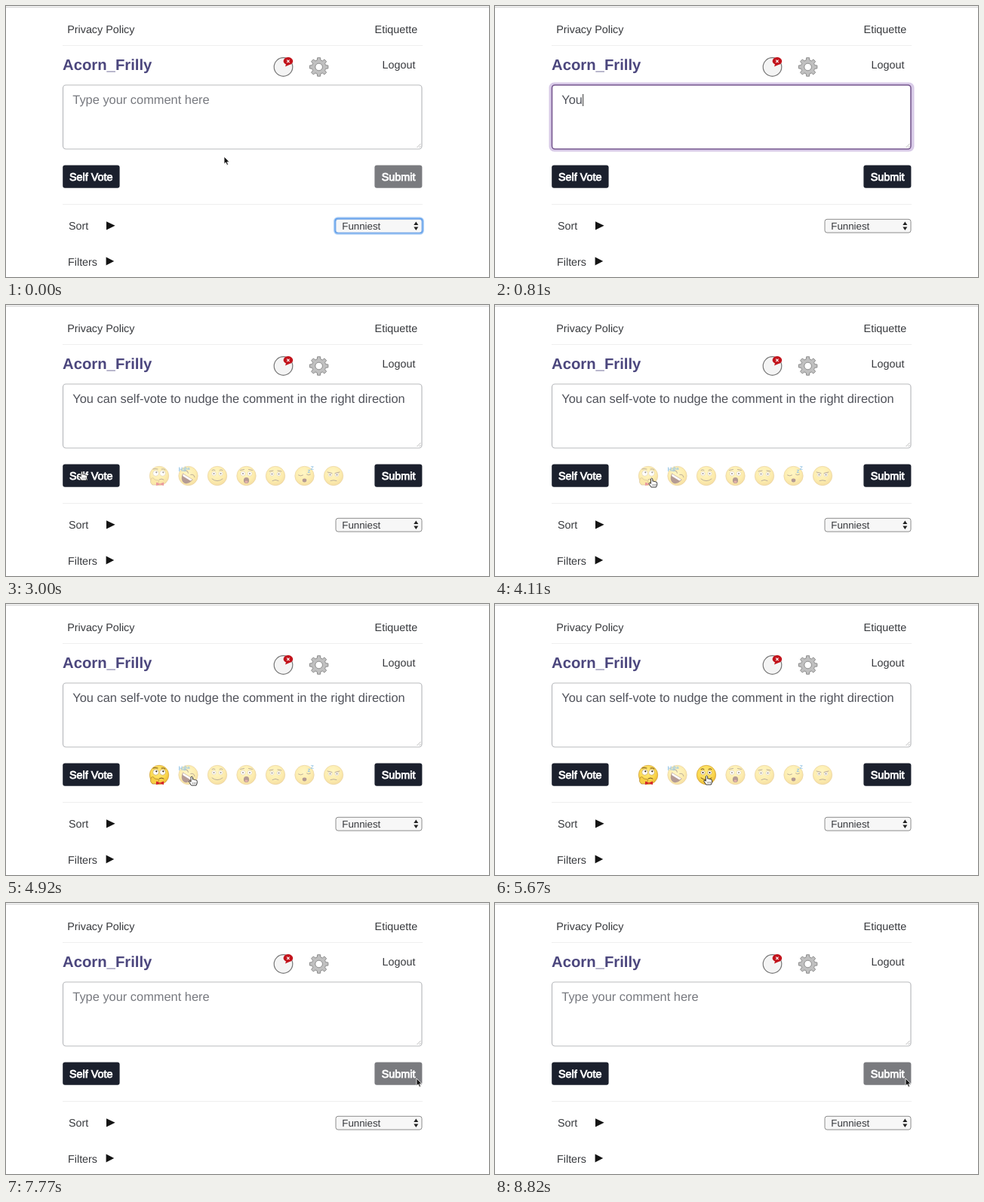
An HTML page for the animation above (8850 ms loop, 640 px wide and 360 px high).

```html
<!DOCTYPE html>
<html lang="en">
<head>
<meta charset="utf-8">
<title>Comment form</title>
<style>
html, body { margin: 0; width: 100%; height: 100%; overflow: hidden; background: #fff; }
svg { display: block; width: 640px; height: 360px; }
text { font: 14.35px "Liberation Sans", Arial, sans-serif; fill: #37393d; white-space: pre; text-rendering: geometricPrecision; }
.name { font-size: 20.3px; font-weight: bold; fill: #4b467d; }
.button text { fill: #fff; stroke: #fff; stroke-width: .8px; }
#comment { font-size: 16.4px; }
.line { fill: none; stroke: #6d4d20; stroke-width: 1; stroke-linecap: round; stroke-linejoin: round; }
</style>
</head>
<body>
<svg viewBox="0 0 640 360">
  <defs>
    <radialGradient id="skin" cx=".45" cy=".35" r=".65">
      <stop offset="0" stop-color="#ffec80"/>
      <stop offset=".65" stop-color="#fbd84f"/>
      <stop offset="1" stop-color="#ecb935"/>
    </radialGradient>
  </defs>
  <path d="M0 1.5H640" stroke="#dadada" stroke-width="1.5"/>
  <path d="M75 52.5H552M75 263.5H552" stroke="#efefef"/>

  <text x="81.2" y="35.5">Privacy Policy</text>
  <text x="488.6" y="35.5">Etiquette</text>
  <text x="498.5" y="83.2">Logout</text>
  <text x="75" y="85" class="name">Acorn_Frilly</text>
  <text x="83" y="296.7">Sort</text>
  <text x="82" y="344.7">Filters</text>
  <path d="M133 286.2L144.6 291.8L133 297.4ZM132.6 333.6L143.2 339L132.6 344.4Z" fill="#141414"/>

  <circle cx="367.5" cy="81" r="12.3" fill="#f4f4f4" stroke="#777" stroke-width="1.2"/>
  <path d="M367.6 73.3a6.3 5.2 0 1 1 7.6 5l-5.2 2.2 1-3a5.4 5 0 0 1-3.4-4.2Z" fill="#c2141c"/>
  <path d="M372.2 71.7l3.4 3.4m0-3.4l-3.4 3.4" stroke="#fff" stroke-width="1.1"/>
  <path id="gear" transform="translate(414.6 81)" fill="#c0c0c0" stroke="#8c8c8c" fill-rule="evenodd" stroke-linejoin="round"/>

  <rect id="glow" x="73.5" y="103.5" width="480" height="88" rx="5" fill="none" stroke="#d9cbe8" stroke-width="4"/>
  <rect id="area" x="75.5" y="105" width="475.5" height="85" rx="4" fill="#fff"/>
  <path d="M544.5 188l5-5m-2 5l2-2" stroke="#aaa" stroke-width=".8"/>
  <text id="comment" x="88.3" y="130"></text>
  <path id="caret" stroke="#333"/>

  <g class="button">
    <rect x="75.2" y="211.4" width="75.4" height="30.4" rx="3" fill="#1b202d"/>
    <text x="84" y="231.8">Self Vote</text>
    <rect id="submit" x="488.4" y="211.4" width="63" height="30.4" rx="3"/>
    <text x="497.8" y="231.8">Submit</text>
  </g>

  <g id="focus" fill="none" stroke="#5b9dec">
    <rect x="435.5" y="281.8" width="117" height="20.5" rx="4" stroke-width="3" opacity=".5"/>
    <rect x="436.5" y="282.8" width="115" height="18.5" rx="3" stroke-width="2"/>
  </g>
  <rect id="select" x="437" y="283.3" width="114" height="17.8" rx="3" fill="#f7f7f7"/>
  <text x="445.3" y="296.8" style="font-size:13.3px">Funniest</text>
  <path d="M540.3 291L543.3 286.6L546.3 291ZM540.3 293.6L543.3 298L546.3 293.6Z" fill="#222"/>

  <g id="faces"></g>

  <g id="arrow">
    <path d="M0 0V9.8L2.2 7.8L3.8 11.4L5.5 10.6L4 7.2H7Z" fill="#111" stroke="#fff" stroke-width=".8" stroke-linejoin="round"/>
  </g>
  <g id="hand">
    <path d="M-1.2 1Q0 -.8 1.2 1V4.2Q2.5 3.3 3.3 4.6Q4.6 3.8 5.3 5.2Q7 4.7 7 6.4V9L5.8 12H-.8L-3.6 7.6Q-4 5.7-2.4 6.2L-1.2 7.4Z" fill="#fff" stroke="#222" stroke-width=".9" stroke-linejoin="round"/>
    <path d="M1.3 8v2.2M3.2 8v2.2M5 8v2.2" stroke="#444" stroke-width=".6"/>
  </g>
  <path id="beam" d="M-2-6Q0-6 0-4V4Q0 6-2 6M2-6Q0-6 0-4M0 4Q0 6 2 6" fill="none" stroke="#333" stroke-width=".9"/>
</svg>
<script>
const LOOP = 8850, MESSAGE = "You can self-vote to nudge the comment in the right direction";
const FOCUS = 570, TYPE = 735, PER_CHAR = 21.2, VOTE = 2820, SUBMIT = 7530;
const PICKED = { 0: 4290, 2: 5490 };
const $ = id => document.getElementById(id);
const set = (id, attrs) => { for (const k in attrs) $(id).setAttribute(k, attrs[k]); };
const show = (id, on) => { $(id).style.display = on ? "" : "none"; };
const clamp = v => Math.min(1, Math.max(0, v));
const faceX = i => 203 + 38.5 * i;

// Gear: eight teeth around a round hole
const teeth = [];
for (let i = 0; i < 8; i++)
  for (const [da, r] of [[-.25, 9.3], [-.16, 12.4], [.16, 12.4], [.25, 9.3]]) {
    const a = i * Math.PI / 4 + da;
    teeth.push((r * Math.cos(a)).toFixed(2) + " " + (r * Math.sin(a)).toFixed(2));
  }
set("gear", { d: `M${teeth.join("L")}ZM-4.8 0a4.8 4.8 0 1 0 9.6 0a4.8 4.8 0 1 0-9.6 0Z` });

const line = d => `<path class="line" d="${d}"/>`;
const eyes = (y, r, dx = 0, dy = 0) => [-4.5, 4.5].map(x =>
  `<circle cx="${x}" cy="${y}" r="${r}" fill="#fff" stroke="#b28a3c" stroke-width=".5"/>
   <circle cx="${x + dx}" cy="${y + dy}" r="1.1" fill="#3a2810"/>`).join("");
const mouth = (x, y, rx, ry) => `<ellipse cx="${x}" cy="${y}" rx="${rx}" ry="${ry}" fill="#5b2414"/>`;
const letter = (s, x, y, size) =>
  `<text x="${x}" y="${y}" style="font-size:${size}px;font-weight:bold;fill:#2587c8">${s}</text>`;

const features = [
  // Pondering
  eyes(-3.5, 3.8, .8, -1.2) + line("M-8-9Q-5-10-2-9M3-9Q6-10 8-8M0 5Q3 3 6 5") +
    `<path d="M-11 4Q-8 1-6 5L-1 6Q1 8-2 9L-4 12H-9Q-13 9-11 4Z" fill="#f8cf45" stroke="#a87c2c" stroke-width=".7"/>
     <path d="M-4 8.5L1 10.5L6 8.5V13L1 11.5L-4 13Z" fill="#d4222b"/>`,
  // Laughing
  `<g transform="rotate(32)">${line("M-8-3Q-5-6-2-3M2-3Q5-6 8-3")}
    <path d="M-8 1H8Q6 11 0 11T-8 1Z" fill="#5b2414"/><path d="M-7.4 1.4H7.4L6 4H-6Z" fill="#fff"/></g>` +
    letter("Ha", -13, -6, 8) + letter("ha", -5, -8, 6),
  // Smiling
  eyes(-3, 2.8) + line("M-7 4Q0 9.5 7 4M-7-7.5Q-5-9-3-7.5M3-7.5Q5-9 7-7.5"),
  // Shocked
  eyes(-3, 3) + line("M-8-7.5L-3-8.5M3-8.5L8-7.5") + mouth(0, 6, 3.6, 4) +
    `<ellipse cx="0" cy="8" rx="2" ry="1.4" fill="#c65347"/>`,
  // Sad
  eyes(-2.5, 2.6) + line("M-4 6.5Q0 4 4 6.5M-8-6L-3-7M3-7L8-6"),
  // Asleep
  line("M-8-1Q-5 1-2-1M3-2Q5 0 8-2") + mouth(0, 6, 2.8, 2.4) + letter("z", 4, -4, 8) + letter("Z", 8, -8, 7),
  // Angry
  eyes(-1.5, 2.5) + line("M-8-5L-2-3.5M8-5L2-3.5M-4 6.5Q0 5 4 6.5")
];
$("faces").innerHTML = features.map((f, i) =>
  `<g id="face${i}" transform="translate(${faceX(i)} 227)">
    <circle r="12.7" fill="url(#skin)" stroke="#cf9d33" stroke-width=".7"/>${f}</g>`).join("");

// Pointer stops: time, x, y
const stops = [[0, 289, 200], [120, 289, 200], [510, 262, 152], [2310, 262, 152], [2730, 100.5, 221],
  [3150, 100.5, 221], [3930, 207.7, 230], [4500, 207.7, 230], [5310, 280.5, 228], [5730, 280.5, 228],
  [6270, 574, 243], [6420, 574, 243], [6930, 544, 233], [LOOP, 544, 233]];

function pointer(t) {
  const i = stops.findIndex(s => s[0] > t);
  const [t0, x0, y0] = stops[i - 1], [t1, x1, y1] = stops[i];
  const p = (t - t0) / (t1 - t0), e = p * p * (3 - 2 * p);
  return [x0 + (x1 - x0) * e, y0 + (y1 - y0) * e];
}

function render(t) {
  const focused = t >= FOCUS && t < VOTE;
  const sent = t >= SUBMIT;
  const typed = Math.max(0, Math.floor((t - TYPE) / PER_CHAR));
  const count = sent ? 0 : Math.min(typed, MESSAGE.length);
  const voting = t >= VOTE && !sent;

  $("comment").textContent = count ? MESSAGE.slice(0, count) : "Type your comment here";
  $("comment").style.fill = count ? "#50525a" : "#77797f";
  const end = 89 + (count ? $("comment").getComputedTextLength() : 0);
  set("caret", { d: `M${end} 117V133` });
  show("caret", focused && (t < 2200 || t > 2650));
  show("glow", focused);
  set("area", { stroke: focused ? "#76578f" : "#b9bbbe", "stroke-width": focused ? 1.6 : 1.2 });
  set("submit", { fill: count ? "#1b202d" : "#7a7b7f" });
  show("focus", t < FOCUS);
  set("select", { stroke: t < FOCUS ? "#8fb6e8" : "#8c8c8c" });

  show("faces", voting);
  features.forEach((_, i) => {
    const lit = i in PICKED ? clamp((t - PICKED[i]) / 150) : 0;
    set("face" + i, { opacity: clamp((t - VOTE) / 120) * (.45 + .55 * lit) });
  });

  const [x, y] = pointer(t);
  const within = (a, b) => x >= a && x <= b && y >= 211 && y <= 242;
  const overFace = voting && features.some((_, i) => Math.hypot(x - faceX(i), y - 227) < 13);
  const kind = t > 690 && t < 2310 ? "" :
    y > 105 && y < 190 ? "beam" :
    within(75, 151) || count && within(488, 551.5) || overFace ? "hand" : "arrow";
  for (const id of ["arrow", "hand", "beam"]) {
    show(id, id === kind);
    set(id, { transform: `translate(${x} ${y})` });
  }
}

const start = performance.now();
function tick() {
  render((performance.now() - start) % LOOP);
  requestAnimationFrame(tick);
}
tick();
</script>
</body>
</html>
```
